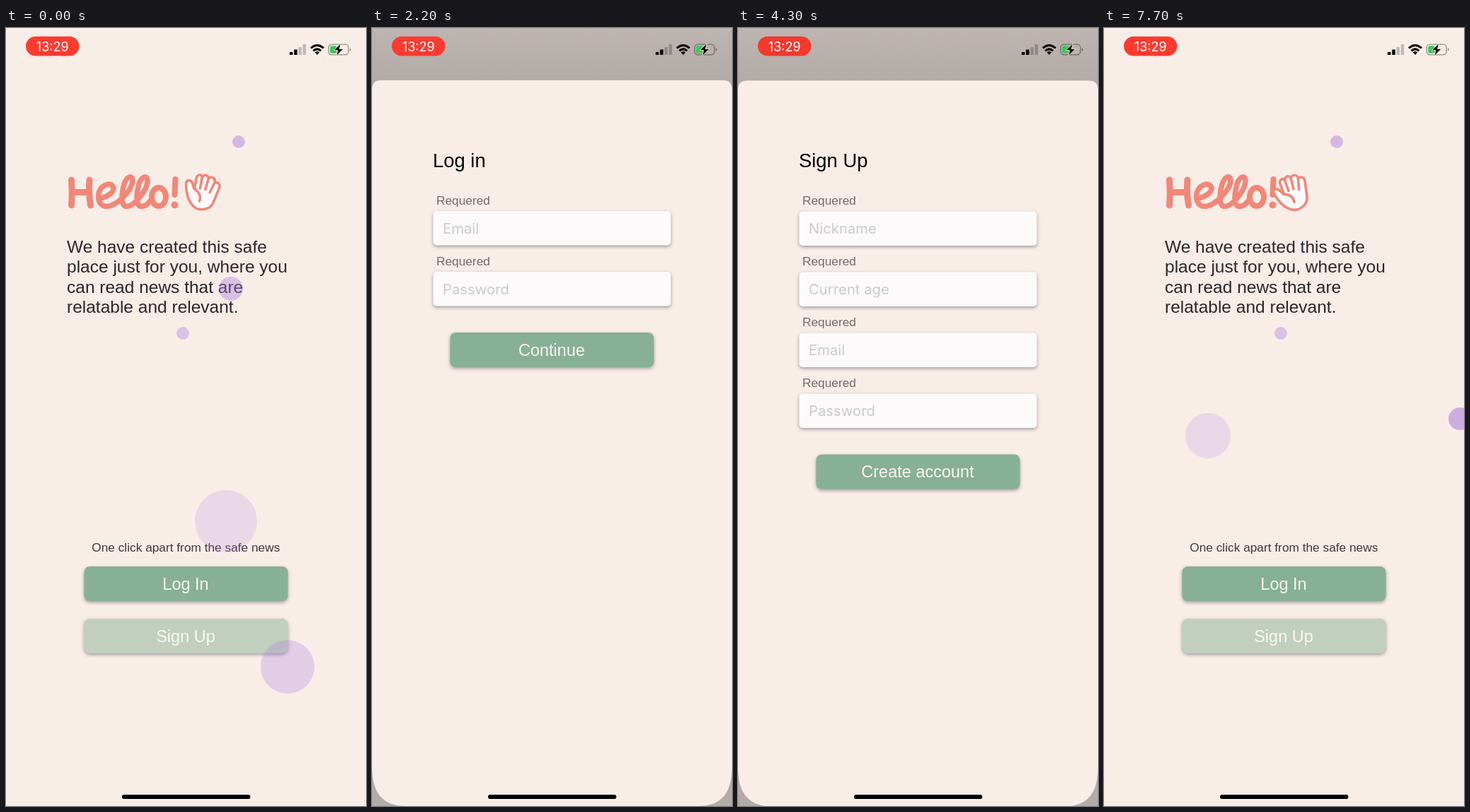
An HTML page that plays this animation: 509x1101 px, repeating every 7.8 s.

```html
<!DOCTYPE html>
<html lang="en">
<head>
<meta charset="utf-8">
<style>
html, body { margin: 0; height: 100%; overflow: hidden; background: #f9ede8; }
svg { display: block; width: 100%; height: 100%; }
text { font-family: "Liberation Sans", Arial, sans-serif; font-size: 23.5px; }
.ui { font-family: Inter, sans-serif; }
.body { font-size: 24.5px; fill: #2c262b; }
.note { font-size: 17.3px; }
.title { font-size: 27.4px; }
.mid { text-anchor: middle; fill: #fbf6f4; }
.raised { filter: drop-shadow(0 2.5px 2.5px rgba(75, 65, 85, .5)); }
.script { fill: none; stroke: #f08879; stroke-linecap: round; stroke-linejoin: round; }
</style>
</head>
<body>
<svg viewBox="0 0 509 1101">
  <defs>
    <linearGradient id="shade" gradientUnits="userSpaceOnUse" x1="0" y1="-150" x2="0" y2="0">
      <stop offset="0" stop-opacity="0"/><stop offset="1" stop-opacity=".1"/>
    </linearGradient>
  </defs>
  <rect width="509" height="1101" fill="#f9ede8"/>
  <g id="home">
    <g class="script" stroke-width="9.5">
      <path d="M92.5 215Q94 234 92.5 251M118 215Q116.500 234 119.500 251M94 232.500H117" stroke-width="9"/>
      <path stroke-width="7.5" d="M133 241C144 239 153 232 152 226C150 218 137 220 132 231C128 243 133 252.500 143 252.500C157 252 180 228 179 215C178 207 170 211 167 221C163 235 162 252.500 171 252.500C182 252 201 228 200 215C199 207 191 211 188 221C184 235 183 252.500 192 252.500C198 252 202 248 205 243"/>
      <ellipse cx="216" cy="239" rx="10" ry="13" stroke-width="8"/>
      <path d="M239.500 214L238.500 236" stroke-width="8"/>
    </g>
    <circle cx="238.500" cy="250.500" r="5" fill="#f08879"/>
    <g id="hand" class="script" stroke-width="3.600">
      <path fill="#fffafa" d="M270 256C259 251 253 236 253 221C253 215 260 215 262 221L265 228L267 213C268 207 275 206 275 212C277 206 285 207 284 213C287 208 295 211 293 218C296 216 302 219 300 225L293 245C290 255 280 258 270 256Z"/>
      <path d="M275 212L273 227M284 213L280.500 228M293 218L287 232M264 227C269 231 276 235 273 245"/>
    </g>
  </g>
  <g id="bubbles"></g>
  <rect id="dim" width="509" height="1101"/>
  <g id="sheets"></g>
  <rect id="pill" x="28" y="12" width="75.500" height="27.500" rx="13.700"/>
  <text class="ui mid" x="65.700" y="32.700" style="font-size:18px;fill:#fff">13:29</text>
  <path d="M401 34h4.500v4h-4.500zM407.300 30.500h4.500v7.500h-4.500z"/>
  <path d="M413.500 27h4.500v11h-4.500zM419.700 23h4.500v15h-4.500z" fill-opacity=".22"/>
  <g fill="none" stroke="#000" stroke-width="3">
    <path d="M431 28.500Q440 20.500 449 28.500M434.500 32.300Q440 27.500 445.500 32.300"/>
  </g>
  <path d="M436.700 34.500Q440 31.500 443.300 34.500L440 38Z"/>
  <rect x="456.200" y="23.200" width="28" height="14.600" rx="4.500" fill="none" stroke="#000" stroke-opacity=".4" stroke-width="1.300"/>
  <path d="M486 28Q489.500 30.500 486 33Z" fill-opacity=".4"/>
  <rect x="458.200" y="25.200" width="9.500" height="10.600" rx="2.500" fill="#3cc65b"/>
  <path d="M473.500 22L463.500 31.500H469L467 39.500L477 29.500H471.500Z" stroke="#f9ede8" stroke-width=".8"/>
  <rect x="164" y="1085" width="181.500" height="6" rx="3"/>
</svg>
<script>
const LOOP = 7800, STEP = 100, TOP = 74, H = 1101, TRAVEL = H - TOP;
const $ = id => document.getElementById(id);
const label = (s, x, y, cls, fill = '') =>
  `<text class="${cls}" x="${x}" y="${y}"${fill && ` fill="${fill}"`}>${s}</text>`;
const button = (s, y, fill) =>
  `<rect class="raised" x="110.500" y="${y}" width="288" height="49" rx="8" fill="${fill}"/>` +
  label(s, 254, y + 33, 'mid');
const field = (s, y) =>
  label('Requered', 91, y - 9, 'note', '#766b6c') +
  `<rect class="raised" x="86.500" y="${y}" width="336" height="48.500" rx="5" fill="#fdfafc"/>` +
  `<text class="ui" x="100" y="${y + 32}" fill="#cdc8cb" style="font-size:20.300px">${s}</text>`;

// Each sheet rises at `up` and is dragged away from `down`.
const sheets = [
  { title: 'Log in', fields: ['Email', 'Password'], action: 'Continue', up: 1000, down: 2405 },
  { title: 'Sign Up', fields: ['Nickname', 'Current age', 'Email', 'Password'],
    action: 'Create account', up: 3750, down: 5575 }
];

// Bubble keys: time, x, y, radius, opacity.
const bubbles = [
  [[0, 329, 161, 9, .45], [LOOP, 329, 161, 9, .45]],
  [[0, 250, 432, 9, .38], [LOOP, 250, 432, 9, .38]],
  [[0, 318, 369, 17, .4], [2800, 408, 442, 17, .58], [4200, 440, 500, 5, 0]],
  [[0, 311, 698, 44, .19], [1300, 280, 640, 40, 0]],
  [[0, 398, 904, 38, .28], [1300, 370, 870, 30, 0]],
  [[5700, 203, 151, 14, 0], [6100, 224, 236, 17, .12], [7700, 147, 577, 32, .2]],
  [[5900, 380, 895, 3, .2], [6100, 389, 861, 6, .5], [7700, 503, 553, 16, .55]]
];

$('home').innerHTML +=
  ['We have created this safe', 'place just for you, where you',
   'can read news that are', 'relatable and relevant.']
    .map((s, i) => label(s, 86, 318 + i * 28.3, 'body')).join('') +
  `<text class="note" x="254.300" y="741" text-anchor="middle" fill="#3f393c">One click apart from the safe news</text>` +
  button('Log In', 762, '#87b096') + button('Sign Up', 836, '#c2cfbe');

$('sheets').innerHTML = sheets.map(s => `<g>
  <rect y="-150" width="509" height="${TRAVEL + 150}" fill="url(#shade)"/>
  <path fill="#f9ede8" d="M0 13Q0 0 13 0H496Q509 0 509 13V${TRAVEL - 55}Q509 ${TRAVEL} 462 ${TRAVEL}H47Q0 ${TRAVEL} 0 ${TRAVEL - 55}Z"/>
  ${label(s.title, 86, 123, 'title')}
  ${s.fields.map((f, i) => field(f, 185 + 86 * i)).join('')}
  ${button(s.action, 185 + 86 * s.fields.length, '#87b096')}
</g>`).join('');
$('bubbles').innerHTML = bubbles.map(() => '<circle fill="#a878dc"/>').join('');

const clamp = v => Math.max(0, Math.min(1, v));

function openness(t, { up, down }) {
  if (t < up) return 0;
  if (t < down) {
    const k = (t - up) * .01826; // critically damped spring
    return 1 - (1 + k) * Math.exp(-k);
  }
  const u = clamp((t - down) / 720);
  return 1 - u * u * (3 - 2 * u);
}

function sample(keys, t) {
  const i = keys.findIndex((k, n) => n && t <= k[0]);
  if (t < keys[0][0]) return [0, 0, 0, 0];
  if (i < 0) return keys[keys.length - 1].slice(1);
  const a = keys[i - 1], b = keys[i], u = (t - a[0]) / (b[0] - a[0]);
  return a.slice(1).map((v, n) => v + (b[n + 1] - v) * u);
}

function draw(t) {
  const turn = 20 * Math.cos((t - 2750) / 3300 * 2 * Math.PI) - 7;
  $('hand').setAttribute('transform', `rotate(${turn} 274 254)`);

  bubbles.forEach((keys, i) => {
    const c = $('bubbles').children[i], v = sample(keys, t);
    ['cx', 'cy', 'r', 'opacity'].forEach((name, n) => c.setAttribute(name, v[n]));
  });

  let dim = 0;
  sheets.forEach((s, i) => {
    const p = openness(t, s), g = $('sheets').children[i];
    dim = Math.max(dim, p);
    g.setAttribute('transform', `translate(0 ${H - TRAVEL * p})`);
    g.setAttribute('visibility', p > 0 ? 'visible' : 'hidden');
    g.firstElementChild.setAttribute('opacity', p);
  });
  $('dim').setAttribute('fill-opacity', .2 * dim);

  const glow = Math.min(255, 240 + 20 * Math.cos(t / 1940 * 2 * Math.PI));
  $('pill').setAttribute('fill', `rgb(${glow},${glow * .232},${glow * .19})`);
}

const start = performance.now();
function tick() {
  const t = (performance.now() - start) % LOOP;
  draw(Math.floor(t / STEP) * STEP);
  requestAnimationFrame(tick);
}
tick();
</script>
</body>
</html>
```
